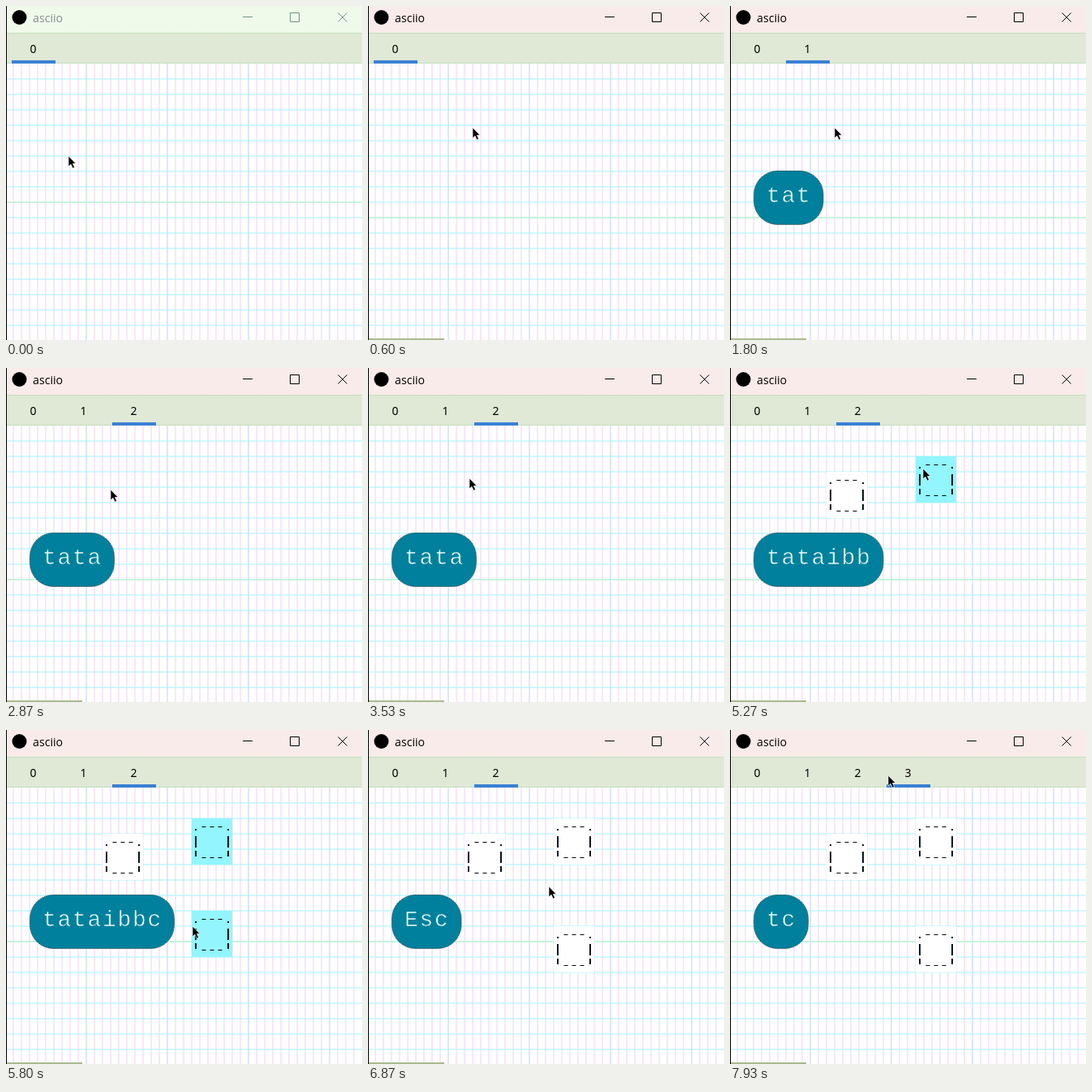
Write an HTML page that moves like this. It is 439 px wide and 412 px high and loops after 8000 ms.

```html
<!DOCTYPE html>
<html lang="en">
<head>
<meta charset="utf-8">
<title>asciio</title>
<style>
  html, body { margin: 0; width: 100%; height: 100%; overflow: hidden; background: #fff; }
  svg { display: block; width: 100vw; height: 100vh; }
  .title { font: 14.2px "Open Sans", sans-serif; }
  .tab { font: 14px "Noto Sans", sans-serif; text-anchor: middle; }
  .keys { font: 28px "Liberation Mono", monospace; letter-spacing: 1.7px; fill: #f4ffff; stroke: #00809c; stroke-width: .6; }
</style>
</head>
<body>
<svg id="stage" viewBox="0 0 439 412" preserveAspectRatio="none"></svg>
<script>
const LOOP = 8000, TICK = 1000 / 15;
const stage = document.getElementById('stage');

function add(parent, tag, attrs, text) {
  const node = document.createElementNS('http://www.w3.org/2000/svg', tag);
  for (const key in attrs) node.setAttribute(key, attrs[key]);
  if (text !== undefined) node.textContent = text;
  parent.appendChild(node);
  return node;
}
const set = (node, attrs) => { for (const key in attrs) node.setAttribute(key, attrs[key]); };
const show = (node, on) => node.setAttribute('visibility', on ? 'visible' : 'hidden');
const rect = (parent, x, y, width, height, fill, more) =>
  add(parent, 'rect', { x, y, width, height, fill, ...more });
const path = (parent, d, stroke, more) =>
  add(parent, 'path', { d, stroke, fill: 'none', ...more });

// Timed steps: [time, value]
const KEYS = [[0, ''], [1330, 't'], [1470, 'ta'], [1730, 'tat'], [1930, 'tata'],
  [3600, 'tatai'], [3730, 'tataib'], [4400, 'tataibb'], [5470, 'tataibbc'],
  [6470, 'Esc'], [7400, 't'], [7670, 'tc']];
const TABS = [[0, 0], [1470, 1], [1930, 2], [7670, 3]];
const BOXES = [
  { x: 119, y: [[3730, 128]], selected: [3730, 5130] },
  { x: 229, y: [[5130, 109]], selected: [5130, 6470] },
  { x: 229, y: [[5670, 223], [5870, 242]], selected: [5670, 6470] }
];
const POINTER = [[200, 77, 185], [600, 129, 150], [3070, 129, 150], [3530, 125, 136],
  [3870, 125, 136], [4600, 223, 204], [4730, 223, 204], [5130, 238, 124],
  [5470, 238, 124], [5800, 230, 242], [6270, 230, 250], [6870, 223, 193],
  [7270, 223, 193], [7930, 195, 56]];

function stepAt(steps, t) {
  let value;
  for (const [start, v] of steps) if (t >= start) value = v;
  return value;
}

function pointerAt(t) {
  const next = POINTER.findIndex(p => p[0] > t);
  if (next === 0) return POINTER[0].slice(1);
  if (next < 0) return POINTER[POINTER.length - 1].slice(1);
  const [t0, x0, y0] = POINTER[next - 1], [t1, x1, y1] = POINTER[next];
  const k = (t - t0) / (t1 - t0);
  return [Math.round(x0 + (x1 - x0) * k), Math.round(y0 + (y1 - y0) * k)];
}

// Grid: lines on whole coordinates, so each spreads softly over two pixels
rect(stage, 0, 0, 439, 412, '#fff');
for (let x = 9; x < 439; x += 10)
  path(stage, `M${x} 71V412`, x % 100 === 99 ? '#c4caff' : '#f0cffa');
for (let y = 90; y < 412; y += 19)
  path(stage, `M1 ${y}H439`, '#a0f3ff');
const axis = path(stage, 'M1 0H439', '#bdf0b8');

// Window frame
const titleBar = rect(stage, 0, 0, 439, 33, '#fff');
rect(stage, 0, 33, 439, 38, '#e0e8d6');
for (const y of [33.5, 70.5])
  path(stage, `M1 ${y}H439`, '#a6d8a0', { 'stroke-dasharray': '1 1' });
add(stage, 'circle', { cx: 16.5, cy: 14, r: 9, fill: '#000' });
const title = add(stage, 'text', { x: 33, y: 20, class: 'title' }, 'asciio');
const controls = path(stage,
  'M292 13.5H304M350.5 8.5H361.5V19.5H350.5ZM409.5 8.5L420.5 19.5M420.5 8.5L409.5 19.5', '#000');
const tabs = [0, 1, 2, 3].map(i =>
  add(stage, 'text', { x: 33.5 + 62 * i, y: 58, class: 'tab' }, i));
const underline = rect(stage, 7, 67, 54, 4, '#3a80d2');
const status = rect(stage, 1, 410, 93, 2, '#a9b98d');
rect(stage, 0, 0, 1, 412, '#000');

// Text boxes, five cells by three rows
const boxes = BOXES.map(() => {
  const group = add(stage, 'g', {});
  const fill = rect(group, 0, 0, 50, 57, '#fff');
  path(group, 'M12.5 10.5H38M12.5 48.5H38', '#000', { 'stroke-dasharray': '5 5' });
  path(group, 'M5 13V15M5 22V36M5 40V47M45 13V15M45 22V36M45 40V47', '#00151a', { 'stroke-width': 2 });
  return { group, fill };
});

// Key display
const keyGroup = add(stage, 'g', {});
const pill = rect(keyGroup, 29.5, 203.5, 86, 66, '#00809c',
  { stroke: '#00202a', 'stroke-dasharray': '1 1' });
const keyText = add(keyGroup, 'text', { x: 45, y: 242, class: 'keys' });

const pointer = add(stage, 'path', {
  d: 'M0 0V13L3 10.3L5.3 15.2L7.6 14.1L5.4 9.5H9.2Z',
  fill: '#000', stroke: '#fff', 'stroke-width': .7
});

function draw(time) {
  const t = Math.floor((time % LOOP + 4) / TICK) * TICK + 1;
  const active = t > 200;
  const ink = active ? '#000' : '#7d938b';
  set(titleBar, { fill: active ? '#f9ebe9' : '#effaea' });
  set(title, { fill: ink });
  set(controls, { stroke: active ? '#000' : '#6f9287' });
  set(axis, { transform: `translate(0 ${t < 330 ? 242 : 261})` });
  show(status, t >= 330);

  const current = stepAt(TABS, t);
  tabs.forEach((tab, i) => show(tab, i <= current));
  set(underline, { x: 7 + 62 * current });

  boxes.forEach(({ group, fill }, i) => {
    const { x, y: steps, selected: [from, to] } = BOXES[i];
    const y = stepAt(steps, t);
    show(group, y !== undefined);
    if (y !== undefined) set(group, { transform: `translate(${x} ${y})` });
    set(fill, { fill: t >= from && t < to ? '#93f5fd' : '#fff' });
  });

  const keys = stepAt(KEYS, t);
  show(keyGroup, keys);
  const width = 30 + 18.5 * keys.length;
  set(pill, { width, rx: Math.min(29, width / 2) });
  if (keyText.textContent !== keys) keyText.textContent = keys;

  set(pointer, { transform: `translate(${pointerAt(t).join(' ')})` });
}

const start = performance.now();
function frame() {
  draw(performance.now() - start);
  requestAnimationFrame(frame);
}
frame();
</script>
</body>
</html>
```
